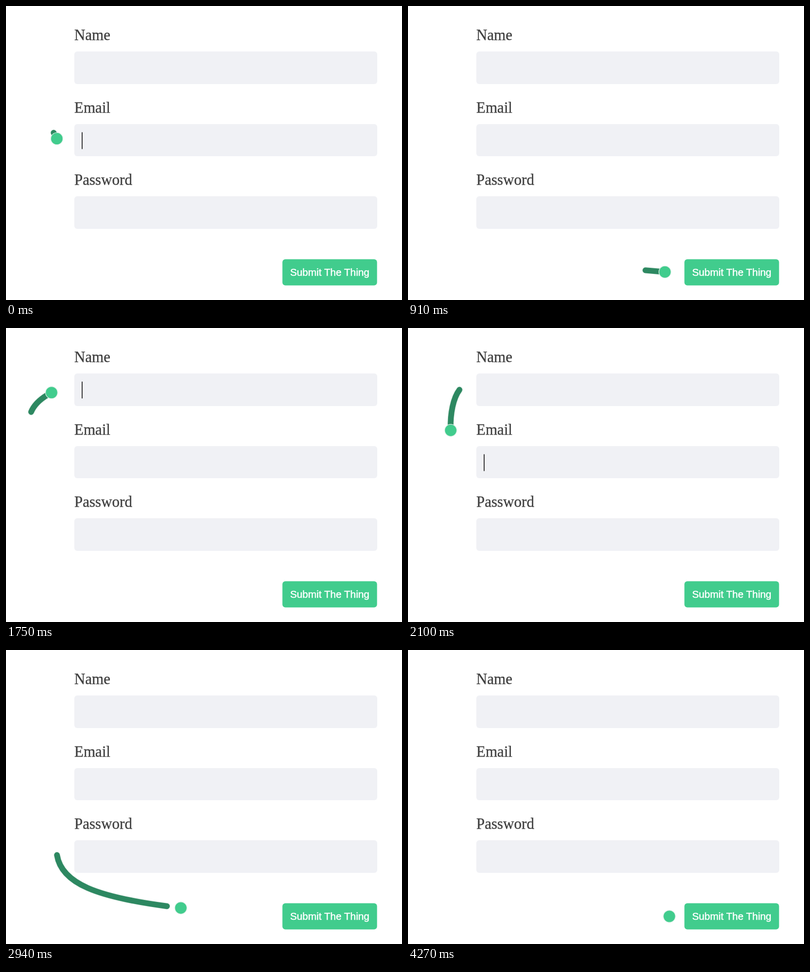
Animation of 800x595 px, one loop 4.83 s. Source, as an HTML page:

```html
<!DOCTYPE html>
<html lang="en">
<head>
<meta charset="utf-8">
<title>Focus follower</title>
<style>
  html, body { margin: 0; width: 100%; height: 100%; overflow: hidden; background: #fff; }
  svg { display: block; width: 800px; height: 595px; }
  .label { font: 30.5px "Liberation Serif", Times, serif; fill: #404040; stroke: #404040; stroke-width: .35; }
  .field { fill: #f0f1f5; }
  .button { fill: #41cc8d; }
  .caption { font: 20.4px "Liberation Sans", Arial, sans-serif; fill: #fff; stroke: #fff; stroke-width: .5; text-anchor: middle; }
  .tail { fill: none; stroke-linecap: round; }
</style>
</head>
<body>
<svg viewBox="0 0 800 595">
  <g id="form"></g>
  <rect class="button" x="558.4" y="512.4" width="191.2" height="53.2" rx="6"/>
  <text class="caption" x="654" y="546">Submit The Thing</text>
  <rect id="caret" x="153" width="1.5" height="34"/>
  <path class="tail" id="halo" stroke="#d3e5dc" stroke-width="13"/>
  <path class="tail" id="tail" stroke="#2d8861" stroke-width="11.4"/>
  <circle id="dot" r="12.2" fill="#41cc8d" stroke="#dcefe6" stroke-width="1.2"/>
</svg>
<script>
const LOOP = 4830, STEP = 70, FLIGHT = 500;
const LAG_PER_PIXEL = .038;
const RETRACT_AT = 258, RETRACT_FOR = 247;
const $ = id => document.getElementById(id);

const fields = [
  { label: 'Name', top: 92, height: 66 },
  { label: 'Email', top: 239, height: 65 },
  { label: 'Password', top: 385, height: 66 }
];
$('form').innerHTML = fields.map(f => `
  <text class="label" x="138" y="${f.top - 23}">${f.label}</text>
  <rect class="field" x="138" y="${f.top}" width="612" height="${f.height}" rx="6"/>`).join('');

const routes = {
  nameToEmail: { d: 'M104 125C80 157 80 239 104.5 271', field: 1 },
  emailToPassword: { d: 'M104.5 271C77 303 77 384 103 415', field: 2 },
  passwordToSubmit: { d: 'M103 415C116 497 255 516 528 539' },
  submitToName: { d: 'M528 539C370 455 -118 222 104 125', field: 0 }
};
const moves = [
  [-408, routes.nameToEmail],
  [37, routes.emailToPassword],
  [500, routes.passwordToSubmit],
  [1339, routes.submitToName],
  [1938, routes.nameToEmail],
  [2345, routes.emailToPassword],
  [2760, routes.passwordToSubmit]
];

// Cubic timing curve (.25, .1, .25, 1)
function ease(p) {
  if (p <= 0) return 0;
  if (p >= 1) return 1;
  const bezier = (u, a, b) => 3 * a * u * (1 - u) ** 2 + 3 * b * u * u * (1 - u) + u ** 3;
  let low = 0, high = 1;
  for (let i = 0; i < 24; i++) {
    const mid = (low + high) / 2;
    if (bezier(mid, .25, .25) < p) low = mid; else high = mid;
  }
  return bezier(low, .1, 1);
}

function drawTail(route, start, end, length) {
  const visible = end - start > .004;
  for (const path of [$('halo'), $('tail')]) {
    path.setAttribute('d', route.d);
    path.setAttribute('visibility', visible ? 'visible' : 'hidden');
    path.setAttribute('stroke-dasharray', `${(end - start) * length} ${length * 2}`);
    path.setAttribute('stroke-dashoffset', -start * length);
  }
}

function render(time) {
  const [began, route] = moves.filter(m => m[0] <= time).pop();
  const elapsed = time - began;
  $('tail').setAttribute('d', route.d);
  const length = $('tail').getTotalLength();
  const spot = $('tail').getPointAtLength(ease(elapsed / FLIGHT) * length);
  const tailStart = ease((elapsed - RETRACT_AT) / RETRACT_FOR);
  const tailEnd = ease((elapsed - LAG_PER_PIXEL * length) / FLIGHT);

  drawTail(route, tailStart, tailEnd, length);
  $('dot').setAttribute('cx', spot.x);
  $('dot').setAttribute('cy', spot.y);

  const field = fields[route.field];
  $('caret').setAttribute('visibility', field ? 'visible' : 'hidden');
  if (field) $('caret').setAttribute('y', field.top + 16.5);
}

const origin = performance.now();
function tick() {
  const time = (performance.now() - origin) % LOOP;
  render(Math.floor(time / STEP) * STEP);
  requestAnimationFrame(tick);
}
tick();
</script>
</body>
</html>
```
